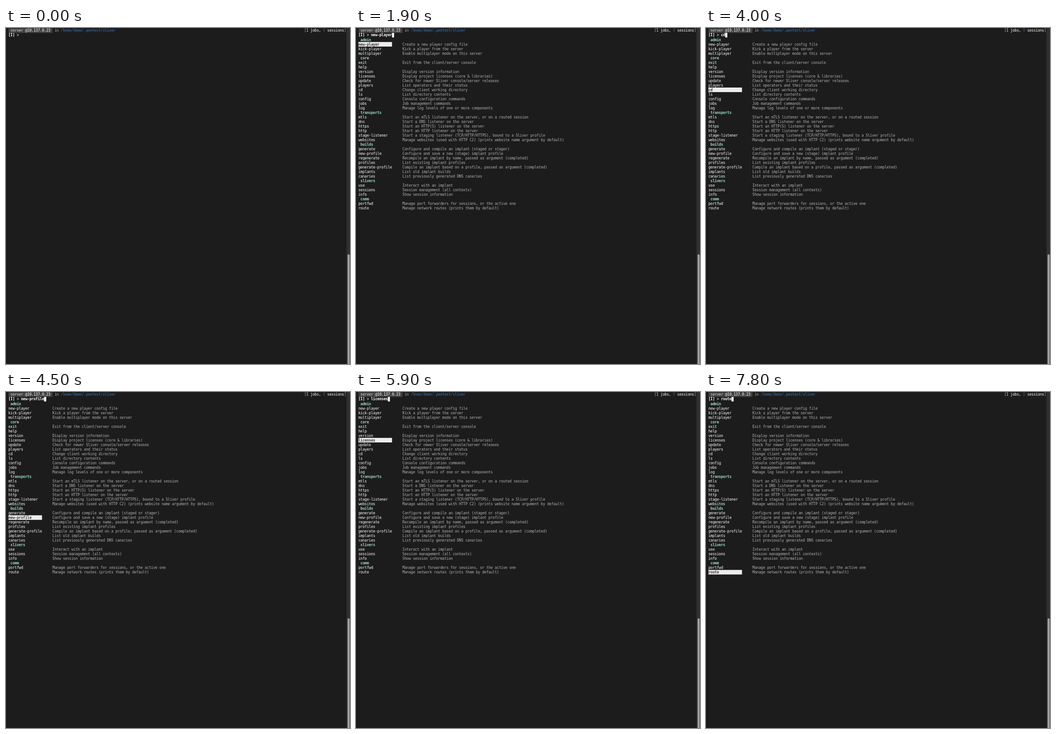
Write an HTML page with a canvas that moves like this. It is 758 px wide and 739 px high and loops after 8 s.

```html
<!DOCTYPE html>
<html lang="en">
<head>
<meta charset="utf-8">
<title>Console completion</title>
<style>
html, body { margin: 0; width: 100%; height: 100%; overflow: hidden; background: #1c1c1c; }
canvas { display: block; }
</style>
</head>
<body>
<canvas id="term" width="758" height="739"></canvas>
<script>
const ctx = document.getElementById('term').getContext('2d');
const LOOP = 8000, BLINK = 600, LIST_AT = 1000;

// The terminal is laid out in 6 x 13 cells on a 984 px wide screen, shown scaled down.
const SCALE = 758 / 984, LEFT = 7, TOP = 1, COL = 6, ROW = 13, BASE = 10;
const SIZE = 32 / 3, ZOOM = 4;
const C = {
  bg: '#1c1c1c', badge: '#424242', white: '#fcfcfc', grey: '#b0b0b0', mint: '#97d8bf',
  pale: '#b9e2d5', blue: '#2d5a8c', pick: '#eeecec', ink: '#3a3636', track: '#303030', thumb: '#a2a2a2'
};

// Lines starting with '#' are group titles.
const menu = `#admin
new-player|Create a new player config file
kick-player|Kick a player from the server
multiplayer|Enable multiplayer mode on this server
#core
exit|Exit from the client/server console
help|
version|Display version information
licenses|Display project licenses (core & libraries)
update|Check for newer Sliver console/server releases
players|List operators and their status
cd|Change client working directory
ls|List directory contents
config|Console configuration commands
jobs|Job management commands
log|Manage log levels of one or more components
#transports
mtls|Start an mTLS listener on the server, or on a routed session
dns|Start a DNS listener on the server
https|Start an HTTP(S) listener on the server
http|Start an HTTP listener on the server
stage-listener|Start a staging listener (TCP/HTTP/HTTPS), bound to a Sliver profile
websites|Manage websites (used with HTTP C2) (prints website name argument by default)
#builds
generate|Configure and compile an implant (staged or stager)
new-profile|Configure and save a new (stage) implant profile
regenerate|Recompile an implant by name, passed as argument (completed)
profiles|List existing implant profiles
generate-profile|Compile an implant based on a profile, passed as argument (completed)
implants|List old implant builds
canaries|List previously generated DNS canaries
#slivers
use|Interact with an implant
sessions|Session management (all contexts)
info|Show session information
#comm
portfwd|Manage port forwarders for sessions, or the active one
route|Manage network routes (prints them by default)`.split('\n').map(line => line.split('|'));

const picks = [
  [1900, 'new-player'], [2400, 'multiplayer'], [2600, 'exit'], [2800, 'help'],
  [3000, 'version'], [3100, 'licenses'], [3500, 'update'],
  [4000, 'cd'], [4100, 'config'], [4200, 'log'], [4300, 'https'], [4400, 'websites'], [4500, 'new-profile'],
  [4700, 'profiles'], [4800, 'implants'], [4900, 'sessions'], [5000, 'portfwd'],
  [5100, 'new-player'], [5200, 'multiplayer'], [5400, 'exit'], [5500, 'help'],
  [5800, 'version'], [5900, 'licenses'], [6600, 'version'], [7000, 'help'], [7100, 'exit'],
  [7300, 'multiplayer'], [7500, 'kick-player'], [7700, 'new-player'], [7800, 'route']
];

function cells(col, row, count, color) {
  ctx.fillStyle = color;
  ctx.fillRect(LEFT + col * COL, TOP + row * ROW, count * COL, ROW);
}

// Text is set large and scaled down, for even spacing on the cell grid.
function text(str, col, row, color, bold) {
  ctx.save();
  ctx.translate(LEFT + col * COL, TOP + row * ROW + BASE);
  ctx.scale(1 / ZOOM, 1 / ZOOM);
  ctx.font = `${bold ? 'bold ' : ''}${SIZE * ZOOM}px "DejaVu Sans Mono", monospace`;
  const gap = COL * ZOOM - ctx.measureText('M').width;
  ctx.letterSpacing = gap + 'px';
  ctx.fillStyle = color;
  ctx.fillText(str, gap / 2, 0);
  ctx.restore();
}

function header() {
  cells(0, 0, 21, C.badge);
  text('server', 1, 0, C.pale);
  text('@10.137.0.23', 8, 0, C.white);
  text('in', 22, 0, C.grey);
  text('/home/demo/.pentest/sliver', 25, 0, C.blue, true);
  text('[', 141, 0, C.grey);
  text('1', 142, 0, C.pale);
  text('jobs,', 144, 0, C.white);
  text('0', 150, 0, C.blue);
  text('sessions', 152, 0, C.white);
  text(']', 160, 0, C.grey);
}

function scrollbar() {
  ctx.fillStyle = C.track;
  ctx.fillRect(974, 0, 10, 960);
  ctx.fillStyle = C.thumb;
  ctx.beginPath();
  ctx.roundRect(977, 646, 6, 330, 3);
  ctx.fill();
}

function list(picked) {
  menu.forEach(([name, info], i) => {
    const row = i + 2;
    if (name[0] === '#') {
      text(name.slice(1), 1, row, C.mint, true);
      return;
    }
    const on = name === picked;
    if (on) cells(0, row, 16, C.pick);
    text(name, 0, row, on ? C.ink : C.white, on);
    if (info) text(info, 21, row, C.grey);
  });
}

function draw(t) {
  let picked = '';
  for (const [at, name] of picks) if (t >= at) picked = name;
  const blinkOn = t < LIST_AT ? t >= 300 && t < 300 + BLINK : t < LIST_AT + BLINK;

  ctx.setTransform(SCALE, 0, 0, SCALE, 0, 0);
  ctx.fillStyle = C.bg;
  ctx.fillRect(0, 0, 984, 960);
  scrollbar();
  header();
  text('[I]', 0, 1, C.white, true);
  text('>', 4, 1, C.white);
  text(picked, 6, 1, C.white, true);
  if (picked || blinkOn) cells(6 + picked.length, 1, 1, C.white);
  if (t >= LIST_AT) list(picked);
}

const start = performance.now();
function tick() {
  draw((performance.now() - start) % LOOP);
  requestAnimationFrame(tick);
}
tick();
</script>
</body>
</html>
```
